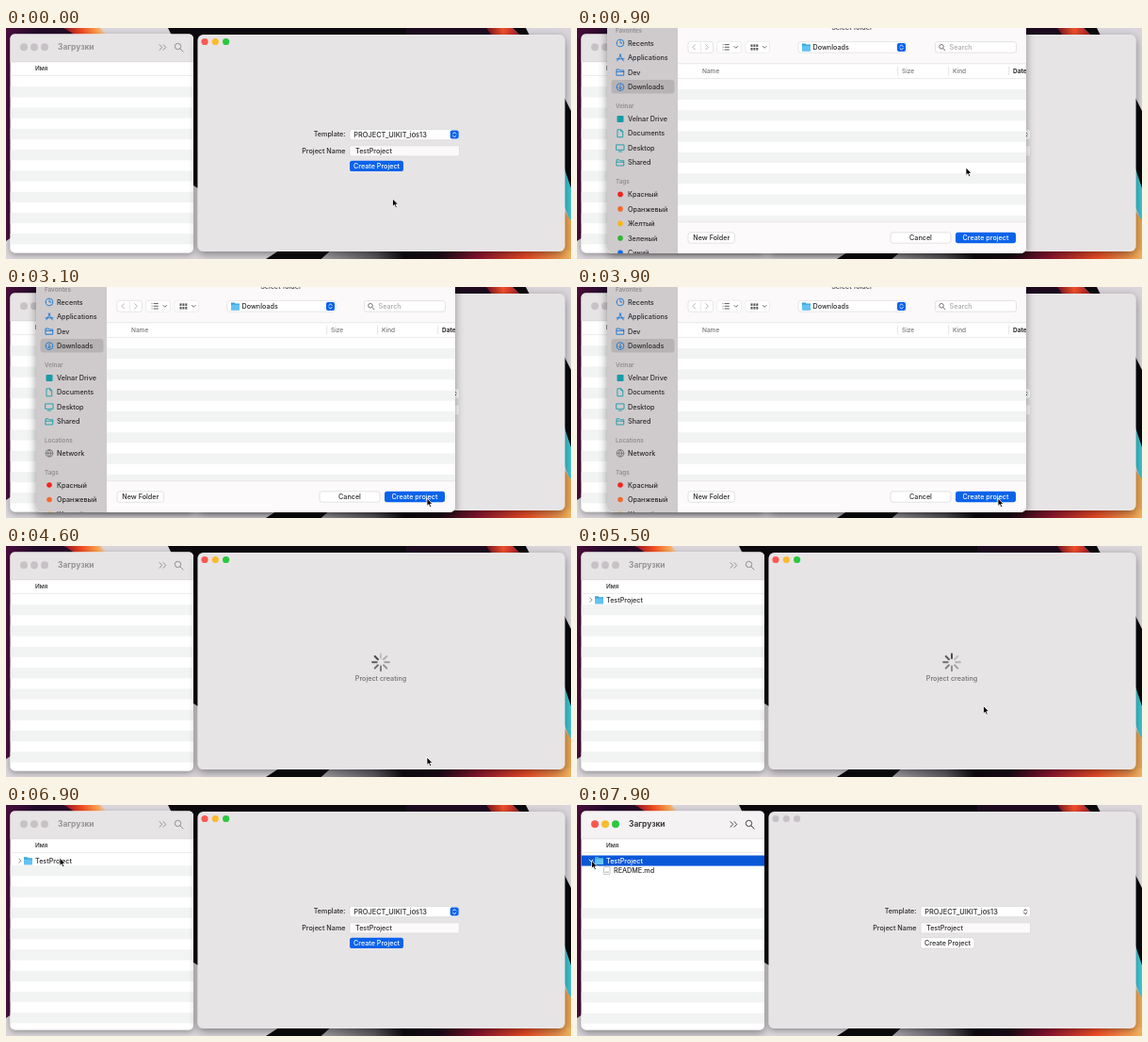
Animation, 600 px wide and 245 px high, one loop 8 s. Source, as an HTML page:

```html
<!DOCTYPE html>
<html lang="en">
<head>
<meta charset="utf-8">
<style>
html, body { margin: 0; width: 100%; height: 100%; overflow: hidden; background: #d9d5da; }
svg { display: block; font: 500 7.2px Inter, "Open Sans", sans-serif; }
</style>
</head>
<body>
<svg id="stage" width="600" height="245" viewBox="0 0 600 245"></svg>
<script>
const BLUE = '#0b63ea', INK = '#29282a', GREY = '#c6c2c5';

const rect = (x, y, w, h, fill, r = 0, more = '') =>
  `<rect x="${x}" y="${y}" width="${w}" height="${h}" rx="${r}" fill="${fill}" ${more}/>`;
const text = (x, y, s, fill = INK, more = '') => `<text x="${x}" y="${y}" fill="${fill}" ${more}>${s}</text>`;
const line = (d, color = '#747174', w = 1) =>
  `<path d="${d}" fill="none" stroke="${color}" stroke-width="${w}" stroke-linecap="round" stroke-linejoin="round"/>`;
const shape = (d, fill) => `<path d="${d}" fill="${fill}"/>`;
const dot = (x, y, r, fill) => `<circle cx="${x}" cy="${y}" r="${r}" fill="${fill}"/>`;
const group = (id, body, more = '') => `<g id="${id}" ${more}>${body}</g>`;
const lights = (x, y, step, r, on) => ['#fb5850', '#f9bc2e', '#2cc840']
  .map((c, i) => dot(x + i * step, y, r, on ? c : GREY)).join('');
const magnifier = (x, y, r, color) =>
  `<circle cx="${x}" cy="${y}" r="${r}" fill="none" stroke="${color}"/>` +
  line(`M${x + r * .75} ${y + r * .75}l${r} ${r}`, color);
const folder = (x, y) =>
  shape(`M${x} ${y}h3.5l1 1h4.5v7h-9z`, '#3aa5dc') + rect(x, y + 2.2, 9, 5.8, '#62c3f2', .7);
const stepper = (x, y, on) =>
  (on ? rect(x, y, 9, 9, BLUE, 2) : '') +
  line(`M${x + 2.9} ${y + 3.6}l1.6 -1.6l1.6 1.6m-3.2 2l1.6 1.6l1.6 -1.6`, on ? '#fff' : INK, .9);
const button = (x, y, w, label, on) =>
  rect(x, y, w, 11.4, on ? BLUE : '#fff', 2.6, on ? '' : 'stroke="#d2cfd1" stroke-width=".6"') +
  text(x + w / 2, y + 8.3, label, on ? '#fff' : INK, 'text-anchor="middle"');
const stripes = (x, y, w, end, first = y) => {
  let s = '';
  for (; y < end; y += 22.3)
    if (y >= first) s += rect(x, y, w, Math.min(11.15, end - y), '#f2f3f3');
  return s;
};
const gradient = (id, stops, way = '') =>
  `<linearGradient id="${id}" gradientUnits="userSpaceOnUse" ${way}>` +
  stops.map(([at, c]) => `<stop offset="${at}" stop-color="${c}"/>`).join('') + '</linearGradient>';

function wallpaper() {
  return rect(0, 0, 600, 245, '#d9d5da') +
    shape('M0 0H62L82 8H6V222L0 226z', 'url(#plum)') +
    shape('M62 0H100L108 8H74z', 'url(#flame)') +
    shape('M172 0H425V8H207V172L196 165V8H176z', '#0b090d') +
    shape('M425 0H512L518 8H425z', '#1d0a20') +
    shape('M510 0H538L546 8H516z', 'url(#ember)') + shape('M538 0H552L556 8H546z', '#0b090d') +
    shape('M590 68L600 88V176L590 150z', '#09080a') +
    shape('M592 146L600 170V208L592 186z', '#3fc3d0') +
    shape('M590 190L600 204V245H590z', '#e9a353') +
    shape('M276 245L290 236H345L335 245z', '#0a090b') +
    shape('M335 245L345 236H460V245z', 'url(#slate)') +
    shape('M460 236H600V245H460z', 'url(#glow)');
}

function finderChrome(on) {
  const ink = on ? '#454346' : '#918e91';
  return shape('M4.5 36V11.5Q4.5 6.5 9.5 6.5H194Q199 6.5 199 11.5V36z', on ? '#f5f2f4' : '#e7e4e6') +
    rect(4.5, 35.5, 194.5, .7, '#d8d5d7') + lights(19, 20.3, 11, 4, on) +
    text(55, 23.3, 'Загрузки', on ? '#3c3a3d' : '#969396', 'font-size="8.4" font-weight="700"') +
    line('M163 17.7l2.8 2.8l-2.8 2.8m4 -5.6l2.8 2.8l-2.8 2.8', ink) + magnifier(182.5, 19.5, 3.2, ink);
}

function finder() {
  return rect(4.5, 6.5, 194.5, 232, '#fff', 5, 'id="finderBack"') +
    text(31, 44.7, 'Имя', INK, 'font-size="6.3"') + rect(4.5, 50.2, 194.5, .6, '#e2e1e2') +
    `<g clip-path="url(#finderClip)">` +
    group('rows', stripes(4.5, 62.2, 194.5, 239) +
      group('item', line('M14 55.2l2 2l-2 2', '#7b787b', .9) + folder(19, 53.2) + text(31, 59.8, 'TestProject'))) +
    group('opened', stripes(4.5, 64.6, 194.5, 239, 100) + rect(4.5, 53.5, 194.5, 11.1, '#0a57d8') +
      line('M13 58l2 2l2 -2', '#fff', .9) + folder(19, 55) + text(31, 61.7, 'TestProject', '#fff') +
      rect(28.5, 65.7, 6.5, 8, '#fff', .5, 'stroke="#a5a3a5" stroke-width=".6"') +
      line('M30 71.2h3.5', '#8b898b', .7) + text(39, 72.4, 'README.md')) +
    '</g>' + group('finderOff', finderChrome(false)) + group('finderOn', finderChrome(true));
}

function form(on) {
  const edge = 'stroke="#d6d3d5" stroke-width=".6"';
  return text(360.5, 115.3, 'Template:', INK, 'text-anchor="end"') +
    rect(365, 107.5, 116.5, 11.2, '#fff', 2.6, edge) +
    text(369.3, 115.5, 'PROJECT_UIKIT_ios13', INK, 'font-size="7.4"') +
    stepper(471.7, 108.6, on) +
    text(360.5, 133, 'Project Name', INK, 'text-anchor="end"') +
    rect(365, 124.8, 116.5, 11.2, '#fbf9fa', 1.5, edge) + text(371, 133, 'TestProject') +
    button(365, 140.7, 57, 'Create Project', on);
}

function app() {
  let spokes = '';
  for (let i = 0; i < 8; i++)
    spokes += `<path class="spoke" d="M398 119v-4.6" stroke="#4c4a4c" stroke-width="2" stroke-linecap="round" transform="rotate(${i * 45} 398 123.3)"/>`;
  return rect(203.5, 7, 390, 230, '#e7e4e6', 6, 'id="appBack"') +
    group('lightsOn', lights(211, 14.5, 11.3, 3.6, true)) +
    group('lightsOff', lights(211, 14.5, 11.3, 3.6, false)) +
    group('formOn', form(true)) + group('formOff', form(false)) +
    group('busy', spokes + text(398, 143.2, 'Project creating', '#706d70', 'text-anchor="middle"'));
}

const head = (y, s) => text(41, y, s, '#8f8c8f', 'font-size="6.3" font-weight="600"');
const place = (y, label, icon, color = '#1475d2') =>
  `<g transform="translate(46 ${y - 2.6})">${line(icon, color, .9)}</g>` + text(54, y, label);

function sidebar() {
  const colors = [['Красный', '#f5231d'], ['Оранжевый', '#f6682b'], ['Желтый', '#f7b519'],
    ['Зеленый', '#2fb536'], ['Синий', '#1668ee']];
  const doc = 'M-2.7 -4h3.4l2 2v6h-5.4zM.7 -4v2h2';
  const box = 'M-3.7 -3h2.8l1 1h3.6v5.2h-7.4zM-3.7 -.6h7.4';
  const screen = 'M-4 -3.4h8v5.4h-8zM-1.8 3.7h3.6';
  const ring = 'M-3.8 0a3.8 3.8 0 1 0 7.6 0a3.8 3.8 0 1 0 -7.6 0';
  const clock = ring + 'M0 -2.2v2.2h1.8';
  const down = ring + 'M0 -2v4m-1.5 -1.5l1.5 1.5l1.5 -1.5';
  const globe = ring + 'h7.6M0 -3.8q-3.2 3.8 0 7.6q3.2 -3.8 0 -7.6';
  const teal = '#169ca8';
  return rect(32, -10, 75, 249, '#cfcbcd') + rect(36.5, 55, 67, 14.5, '#b7b3b5', 3) +
    head(5, 'Favorites') + place(18.6, 'Recents', clock) +
    place(34.1, 'Applications', 'M-3.2 3.4L.8 -3.6M3.2 3.4L-.8 -3.6M-4 1.3h8') +
    place(49.6, 'Dev', box) + place(65.2, 'Downloads', down) +
    head(85.3, 'Velnar') + rect(42.5, 93, 7, 7, teal, 1) + text(54, 98.8, 'Velnar Drive') +
    place(114.4, 'Documents', doc, teal) + place(129.9, 'Desktop', screen, teal) +
    place(145.4, 'Shared', box, teal) +
    group('places', head(165.3, 'Locations') + place(178.9, 'Network', globe, '#777477')) +
    group('tags', head(165.3, 'Tags') + colors.map(([name, c], i) =>
      dot(46, 176.4 + i * 15.5, 2.8, c) + text(54, 179 + i * 15.5, name)).join(''));
}

function sheet() {
  let grid = '';
  for (let i = 0; i < 6; i++) grid += rect(184.5 + i % 3 * 2.9, 17.4 + (i > 2) * 3.6, 2, 2.6, '#5e5b5e');
  const small = 'font-size="6.5"';
  return rect(32, -15, 445, 254, '#fff', 6, 'filter="url(#deep)"') +
    `<g clip-path="url(#sheetClip)">` + sidebar() +
    rect(107, 0, 370, 37.5, '#fbf9fa') + text(292, 2.2, 'Select folder', '#4a484a', 'text-anchor="middle"') +
    rect(118, 14.3, 26.5, 12, '#fff', 2.5, 'stroke="#dfdcde" stroke-width=".7"') + rect(131, 15.5, .6, 9.6, '#dfdcde') +
    line('M125.5 17.7l-2.6 2.6l2.6 2.6m11.2 -5.2l2.6 2.6l-2.6 2.6', '#b5b2b5') +
    rect(148.5, 14.3, 26, 12, '#fff', 2.5, 'stroke="#e5e2e4" stroke-width=".6"') +
    line('M155 17.6h.1m2 0h4.3m-6.4 2.7h.1m2 0h4.3m-6.4 2.7h.1m2 0h4.3', '#5e5b5e') +
    line('M167 19.5l1.8 1.8l1.8 -1.8', '#5e5b5e', .9) +
    rect(179, 14.3, 25.5, 12, '#fff', 2.5, 'stroke="#e5e2e4" stroke-width=".6"') + grid +
    line('M197.5 19.5l1.8 1.8l1.8 -1.8', '#5e5b5e', .9) +
    rect(235, 14.6, 115, 11.6, '#fff', 2.6, 'stroke="#dfdcde" stroke-width=".7"') +
    folder(239, 16.5) + text(250.5, 23.1, 'Downloads') + stepper(340, 15.9, true) +
    rect(380.5, 14.6, 86, 11.6, '#fff', 2.6, 'stroke="#d9d6d8" stroke-width=".7"') +
    magnifier(387, 19.8, 2.3, '#747174') + text(395.5, 23, 'Search', '#aaa7aa') +
    rect(107, 37.5, 370, .7, '#dddadc') + rect(107, 53, 370, .6, '#e2dfe1') +
    text(133, 48, 'Name', '#777477', small) + text(345, 48, 'Size', '#777477', small) +
    text(399, 48, 'Kind', '#777477', small) + text(463, 48, 'Date', INK, small + ' font-weight="700"') +
    [340.5, 394.5, 458.5].map(x => rect(x, 40.5, .6, 10, '#d5d2d4')).join('') +
    stripes(107, 65, 370, 205.5) + rect(107, 205.5, 370, 34, '#fcfafb') + rect(107, 205.5, 370, .7, '#e1dee0') +
    button(118, 216.8, 49.5, 'New Folder') + button(333, 216.8, 64, 'Cancel') +
    button(402, 216.8, 64, 'Create project', true) + '</g>';
}

const shadow = (id, dy, blur, opacity) =>
  `<filter id="${id}" x="-10%" y="-10%" width="120%" height="120%"><feDropShadow dx="0" dy="${dy}" stdDeviation="${blur}" flood-opacity="${opacity}"/></filter>`;

const $ = id => document.getElementById(id);
$('stage').innerHTML = '<defs>' + shadow('soft', 2, 3, .35) + shadow('deep', 3, 5, .4) +
  gradient('plum', [[0, '#4a0d3c'], [.4, '#210a2a'], [1, '#2b0a26']], 'x1="0" x2="82"') +
  gradient('flame', [[0, '#8e1228'], [.4, '#f04a22'], [.75, '#fba04a'], [1, '#e9d6cf']], 'x1="62" x2="108"') +
  gradient('ember', [[0, '#6d1020'], [.5, '#f2512a'], [1, '#a0182a']], 'x1="510" x2="546"') +
  gradient('slate', [[0, '#a5a2a7'], [.45, '#5d5b60'], [.7, '#0d0a0e'], [1, '#1a0a16']], 'x1="335" x2="460"') +
  gradient('glow', [[0, '#1a0a16'], [.3, '#8d1430'], [.65, '#ee4b25'], [1, '#eeb25c']], 'x1="460" x2="600"') +
  `<clipPath id="finderClip">${rect(4.5, 36, 194.5, 202.5, '#000', 5)}</clipPath>
  <clipPath id="sheetClip">${rect(32, -15, 445, 254, '#000', 6)}</clipPath></defs>` +
  wallpaper() + finder() + app() + group('sheet', sheet()) +
  group('cursor', `<path d="M0 0V8.4L1.9 6.6L3.3 9.6L4.8 8.9L3.4 6.1H6z" fill="#000" stroke="#fff" stroke-width=".8"/>`);

// Pointer stops: time, x, y
const path = [[100, 410.5, 181], [600, 413, 148], [1500, 413, 148], [2250, 450, 210.5], [2700, 450, 210.5],
  [3100, 447, 224], [4600, 447, 224], [5400, 431.5, 169.5], [5900, 431.5, 169.5], [6800, 57, 56],
  [7000, 57, 56], [7400, 15.5, 59], [8000, 15.5, 59]];
const ease = p => p * p * (3 - 2 * p);
const span = (t, a, b) => ease(Math.min(1, Math.max(0, (t - a) / (b - a))));
const show = (id, on) => $(id).style.display = on ? '' : 'none';
const raise = (id, on) => $(id).setAttribute('filter', `url(#${on ? 'deep' : 'soft'})`);
const spokes = [...document.querySelectorAll('.spoke')];

function draw(t) {
  const open = t >= 900 && t < 4500, busy = t >= 4500 && t < 6200;
  const listed = t >= 5200, expanded = t >= 7500, located = t >= 1100;
  show('sheet', open);
  show('places', located);
  $('tags').setAttribute('transform', `translate(0 ${located ? 33.6 : 0})`);
  show('item', listed);
  show('rows', !expanded);
  $('rows').setAttribute('transform', `translate(0 ${2 * span(t, 5500, 5800)})`);
  show('opened', expanded);
  show('finderOn', expanded);
  show('finderOff', !expanded);
  raise('finderBack', expanded);
  raise('appBack', !expanded);
  show('lightsOn', !open && !expanded);
  show('lightsOff', open || expanded);
  show('formOn', !open && !busy && !expanded);
  show('formOff', open || expanded);
  show('busy', busy);
  const lead = Math.floor(t / 100) + 1;
  spokes.forEach((s, i) => s.setAttribute('opacity', 1 - .11 * ((lead - i + 8) % 8)));

  let x = path[0][1], y = path[0][2];
  for (let i = 1; i < path.length; i++) {
    const [a, x0, y0] = path[i - 1], [b, x1, y1] = path[i];
    if (t < a) break;
    const p = span(t, a, b);
    x = x0 + (x1 - x0) * p;
    y = y0 + (y1 - y0) * p;
  }
  $('cursor').setAttribute('transform', `translate(${x} ${y})`);
}

function tick() {
  draw(performance.now() % 8000);
  requestAnimationFrame(tick);
}
tick();
</script>
</body>
</html>
```
